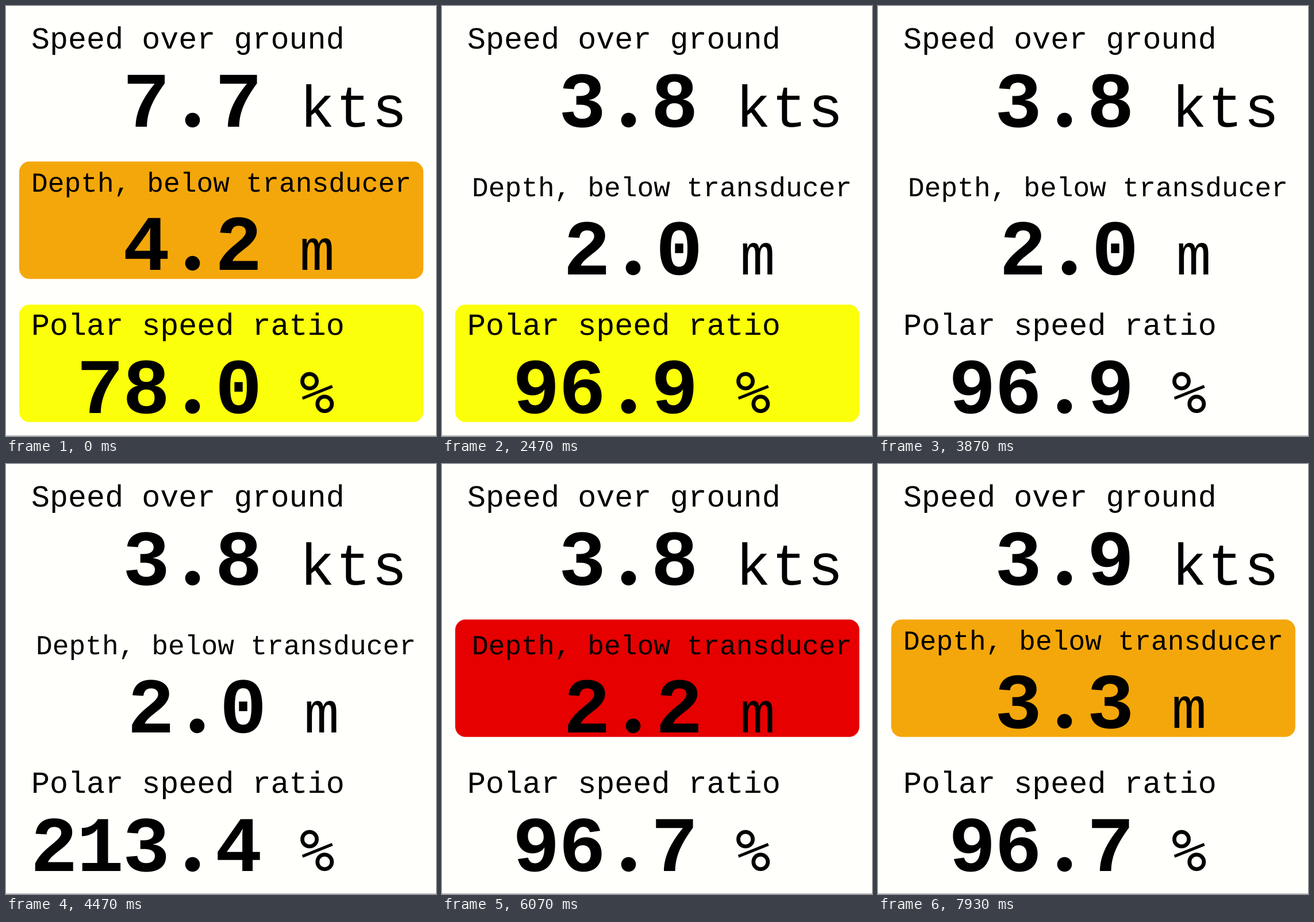
Recreate the animation shown at these times as an HTML page. Size 748x748 px, loop 8 s.

```html
<!DOCTYPE html>
<html lang="en">
<head>
<meta charset="utf-8">
<title>Instrument panel</title>
<style>
  html, body { margin: 0; width: 100%; height: 100%; overflow: hidden; background: #fffffb; }
  svg { display: block; width: 100vw; height: 100vh; }
  text { font-family: "Liberation Mono", monospace; white-space: pre; text-rendering: geometricPrecision; }
  .value { font-size: 137px; font-weight: 700; letter-spacing: -2px; text-anchor: end; }
  .unit { font-size: 102px; letter-spacing: 1.8px; }
  .percent { font-family: "DejaVu Sans Mono", monospace; }
  .point { fill-opacity: 0; }
</style>
</head>
<body>
<svg id="stage" viewBox="0 0 748 748"></svg>
<script>
const LOOP = 8000;
const ORANGE = '#f4a70a', PURPLE = '#780078', RED = '#e60000', YELLOW = '#fbff0a', OFF = 'none';

const panels = {
  speed: { top: 21, label: 'Speed over ground', size: 53.4, unit: 'kts' },
  depth: { top: 270.5, label: 'Depth, below transducer', size: 47.9, unit: 'm' },
  polar: { top: 519.5, label: 'Polar speed ratio', size: 53.4, unit: '%' }
};

// time, panel, changed properties
const steps = [
  [0, 'speed', { value: '7.7', fill: OFF, shift: 0 }],
  [0, 'depth', { value: '4.2', fill: ORANGE, shift: 0 }],
  [0, 'polar', { value: '78.0', fill: YELLOW, shift: 0 }],
  [930, 'depth', { value: '2.0' }],
  [1600, 'speed', { value: '3.8' }],
  [1730, 'polar', { value: '96.9' }],
  [1930, 'depth', { fill: PURPLE, shift: 8 }],
  [2200, 'polar', { fill: OFF }],
  [2400, 'depth', { fill: OFF }],
  [2400, 'polar', { fill: YELLOW }],
  [2530, 'polar', { fill: OFF }],
  [2600, 'depth', { fill: PURPLE }],
  [3530, 'depth', { fill: OFF }],
  [3730, 'depth', { fill: PURPLE }],
  [3870, 'depth', { fill: OFF }],
  [4070, 'depth', { fill: PURPLE }],
  [4330, 'depth', { fill: OFF }],
  [4470, 'polar', { value: '213.4' }],
  [4730, 'depth', { fill: PURPLE }],
  [5070, 'depth', { fill: OFF, value: '2.2' }],
  [5730, 'depth', { fill: RED }],
  [5930, 'depth', { fill: OFF }],
  [6070, 'depth', { fill: RED }],
  [6070, 'polar', { value: '96.7' }],
  [6400, 'depth', { fill: OFF }],
  [6930, 'depth', { fill: ORANGE, value: '3.3', shift: 0 }],
  [7930, 'speed', { value: '3.9' }]
];

const stage = document.getElementById('stage');

function add(parent, tag, attrs, content = '') {
  const node = document.createElementNS('http://www.w3.org/2000/svg', tag);
  for (const key in attrs) node.setAttribute(key, attrs[key]);
  node.textContent = content;
  return parent.appendChild(node);
}

function build({ top, label, size, unit }) {
  const base = Math.floor(top) + 189;
  const box = add(stage, 'rect', { x: 23, y: top, width: 703, height: 204.3, rx: 18 });
  const body = add(stage, 'g', {});
  add(body, 'text', { x: 44, y: base - 136, 'font-size': size }, label);
  const value = add(body, 'text', { class: 'value', x: 443.6, y: base });
  const whole = add(value, 'tspan', {});
  add(value, 'tspan', { class: 'point' }, '.');
  const tenths = add(value, 'tspan', {});
  add(body, 'circle', { cx: 324.5, cy: base - 11.5, r: 12.8 });
  add(body, 'text', { class: unit === '%' ? 'unit percent' : 'unit', x: 510.5, y: base }, unit);
  return { box, body, whole, tenths };
}

const views = {};
for (const name in panels) views[name] = build(panels[name]);
add(stage, 'rect', { x: 0, y: 747, width: 748, height: 1, fill: '#a8a8a8' });

function show({ box, body, whole, tenths }, { value, fill, shift }) {
  box.setAttribute('fill', fill);
  body.setAttribute('transform', `translate(${shift} ${shift})`);
  [whole.textContent, tenths.textContent] = value.split('.');
}

let shown = -1;
function draw(time) {
  const count = steps.filter(([at]) => at <= time).length;
  if (count === shown) return;
  shown = count;
  const state = { speed: {}, depth: {}, polar: {} };
  for (const [, name, change] of steps.slice(0, count)) Object.assign(state[name], change);
  for (const name in views) show(views[name], state[name]);
}

const start = performance.now();
function tick() {
  draw((performance.now() - start) % LOOP);
  requestAnimationFrame(tick);
}
draw(0);
requestAnimationFrame(tick);
</script>
</body>
</html>
```
